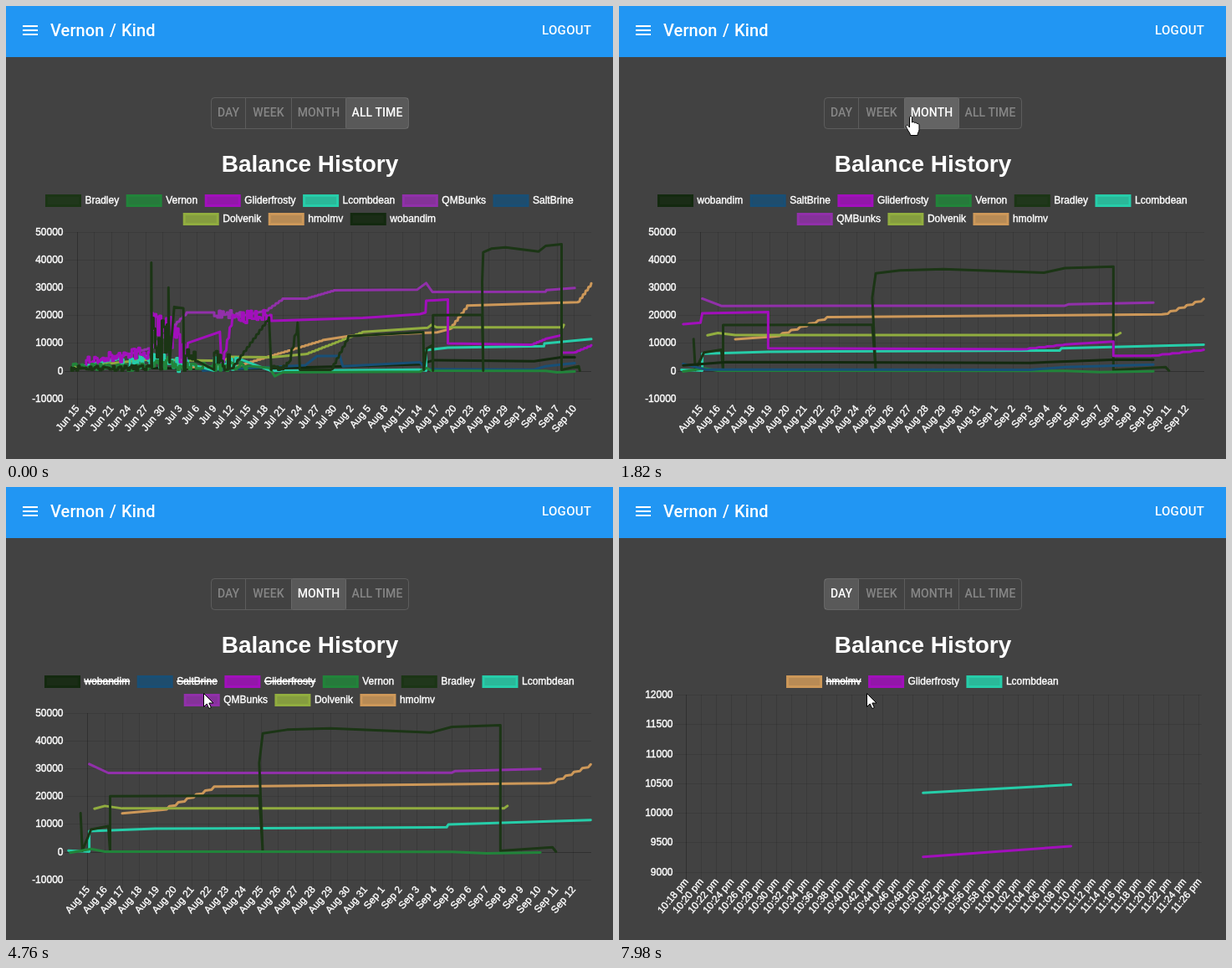
These frames come from a looping animation (726 px wide and 541 px high, 8 s). An HTML page:

```html
<!DOCTYPE html>
<html lang="en">
<head>
<meta charset="utf-8">
<title>Balance History</title>
<style>
html, body { margin: 0; width: 100%; height: 100%; overflow: hidden; background: #424242; }
svg { display: block; width: 726px; height: 541px; }
text { fill: #fff; font: 12px "Liberation Sans", Arial, sans-serif; }
text.ui { font: 500 14px Roboto, sans-serif; }
text.name { font-size: 20px; letter-spacing: .1px; }
text.logout { font-size: 15px; letter-spacing: .3px; }
text.title { font-size: 28px; font-weight: bold; }
.chart text { stroke: #fff; stroke-width: .4px; }
.line { fill: none; stroke-width: 3; stroke-linejoin: round; stroke-linecap: round; }
</style>
</head>
<body>
<svg viewBox="0 0 726 541">
  <rect width="726" height="541" fill="#424242"/>
  <rect width="726" height="61" fill="#2196f3"/>
  <path d="M20 24h18M20 29h18M20 34h18" stroke="#fff" stroke-width="2"/>
  <text class="ui name" x="53" y="36">Vernon</text>
  <text class="ui name" x="124" y="36">/</text>
  <text class="ui name" x="138" y="36">Kind</text>
  <text class="ui logout" x="641" y="34">LOGOUT</text>
  <g id="tabs"></g>
  <text class="title" x="363.5" y="198" text-anchor="middle">Balance History</text>
  <g id="charts"></g>
  <g id="cursor" stroke="#000" fill="#fff" stroke-linejoin="round">
    <path id="arrow" d="M.5 .5V16.5L4.2 13L6.8 18.6L9.4 17.4L6.9 12H12Z"/>
    <path id="hand" d="M-1.5 1.2C-1.3-.9 1.6-.9 1.6 1.2V7C2.4 6 4.4 6.3 4.6 7.6C5.6 6.8 7.2 7.3 7.4 8.6C8.6 8 10 8.8 10 10V15.5C10 18 8 19.5 8 22.5H-.5C-.5 20-3 17.8-4.4 14.6C-5.6 12.4-6.4 11.6-5.4 10.6C-4.2 9.6-2.6 11.4-1.5 13Z"/>
  </g>
</svg>
<script>
const LOOP = 8000, MONTH_AT = 1470, DAY_AT = 6732, RESCALE_AT = 7860;
const $ = id => document.getElementById(id);

function el(parent, tag, attrs = {}, text) {
  const node = document.createElementNS('http://www.w3.org/2000/svg', tag);
  for (const key in attrs) node.setAttribute(key, attrs[key]);
  if (text !== undefined) node.textContent = text;
  return parent.appendChild(node);
}

const show = (node, on) => { node.style.display = on ? '' : 'none'; };
const clamp = v => Math.min(1, Math.max(0, v));
const mix = (a, b, k) => a + (b - a) * k;
const smooth = v => v * v * (3 - 2 * v);
const outQuart = v => 1 - (1 - clamp(v)) ** 4;
const list = (n, fn) => Array.from({ length: n }, (_, i) => fn(i));

let seed = 11;
const random = () => (seed = seed * 16807 % 2147483647) / 2147483647;

// Key points "day,thousands"; "^day,value" climbs there in small steps,
// "~day,low,high" trades at random between two values until that day.
function history(spec) {
  const out = [];
  for (const token of spec.split(' ')) {
    const [d, a, b] = token.replace(/[~^]/, '').split(',').map(Number);
    const [d0, v0] = out[out.length - 1] || [d, a];
    const n = Math.ceil((d - d0) / .6);
    if (token[0] === '^') {
      for (let i = 0; i < n; i++)
        out.push([mix(d0, d, (i + .7) / n), mix(v0, a, (i + .2) / n)],
          [mix(d0, d, (i + 1) / n), mix(v0, a, (i + 1) / n)]);
    } else if (token[0] === '~') {
      for (let i = 0; i < 2 * n; i++) {
        const v = mix(a, b, random());
        out.push([mix(d0, d, i / 2 / n), v], [mix(d0, d, (i + 1) / 2 / n), v]);
      }
    } else out.push([d, a]);
  }
  return out;
}

const users = {
  br: ['Bradley', '#1b3515', '-1,1.2 ~13,0,2 13,39 13.1,1 ~16,0,19 16,30 16.2,3 17,23 18.6,22.5 18.7,2 ~21,0,8 24,.3 ~27,0,7 ^33.6,19.2 34,.3 ~37,0,3 ^38.6,17.3 39,.3 44.4,.3 ^47.5,12.5 60.6,13.9 60.7,.3 61.2,8 62.2,9.2 62.3,0 62.3,20 70.9,20.2 71.1,0 70.9,32 71.1,42.7 72.5,44 75,44.5 80.8,43 82,45 84.8,45.6 84.8,.3 87.8,1.6 88,0'],
  ro: ['Vernon', '#21843a', '-1,1.2 ~13,0,2.5 ~17,0,6 ~30,0,3 33.7,1 34.6,-2 36,-.6 60,-.4 61.2,1 62,0 82,-.1 84,-.6 87.1,-.3'],
  gl: ['Gliderfrosty', '#a20fbc', '1.6,2 ~5,2,5 ~9,3,7 ~13,4,9 ~17,8,21 ~19,3,16 19.4,10 25,14 25.3,2 ^27.2,20 ~34,17,22 34,18 50,19 60,20.4 61,21 61.1,25.2 64.9,25.7 64.9,9.8 79.5,9.4 ^82,11.5 84.8,12.8 84.8,6.5 87,6.6 ^90,9.2'],
  lc: ['Lcombdean', '#26cda9', '1,1.7 ^7.6,4.4 7.8,.7 ~13,.5,6 ~20,-1,6 24,0 ~28,0,5 34,-.1 59.9,.4 61.1,0 61.1,7.4 64.9,8.3 81.7,8.8 81.8,9.8 90,11.4'],
  qm: ['QMBunks', '#9130aa', '2,2.2 ^13,8.3 ^19.2,21 24,21 ~29,19,22 33,21.6 ^36,26 40,26 ^45,29 59.5,29.2 61.1,31.6 62.2,28.4 82,28.5 82.2,29.1 87.1,29.8'],
  sa: ['SaltBrine', '#184f76', '22,0 40,2 42,5.3 46,5.3 46.5,1.6 60,3 61.3,.5 80,.4 82,1.6 87.1,2.7'],
  do: ['Dolvenik', '#91ad3f', '-1,1.2 12.5,4 25.6,3.5 26.8,5 34,4.8 40,6 ^50,14 61.4,15.5 62,16.5 63,15.6 85,15.6 85.2,16.5'],
  hm: ['hmolmv', '#cd9859', '19,1.2 28,1.7 ^43,11 48,12.6 63,13.8 65.2,15 ^68.3,23.5 87.6,24.7 ^90,31.5'],
  wo: ['wobandim', '#13290f', '-1,1.2 28,.6 46,1.5 60,2.3 62.5,3.8 80,3.4 85,4.9 87.1,4.8']
};
const balances = {};
for (const id in users) balances[id] = history(users[id][2]);

// One evening, in minutes past ten
const evening = {
  hm: history('17.3,31.1 55.5,31.2 86.3,31.5'),
  gl: history('49.4,9.03 69,9.42'),
  lc: history('49.4,11.37 69,11.67')
};

const dates = (n, from, step) => list(n, i =>
  new Date(2019, 5, 15 + from + i * step).toLocaleDateString('en-US', { month: 'short', day: 'numeric' }));
const clock = m => `${10 + Math.floor(m / 60)}:${String(m % 60).padStart(2, '0')} pm`;

function drawLegend(c) {
  let row = [], y = 226.5;
  const width = items => items.reduce((sum, item) => sum + item.w + 56, -10);
  const flush = () => {
    let x = 363.6 - width(row) / 2;
    for (const { id, label, w } of row) {
      const color = users[id][1];
      el(c.node, 'rect', { x, y, width: 40, height: 12, fill: color, 'fill-opacity': .85, stroke: color, 'stroke-width': 3 });
      label.setAttribute('x', x + 46);
      label.setAttribute('y', y + 9.5);
      c.strikes[id] = el(c.node, 'path', { d: `M${x + 46} ${y + 5.5}h${w}`, stroke: '#fff', 'stroke-width': 2 });
      x += w + 56;
    }
    row = [];
    y += 22;
  };
  for (const id of c.legend) {
    const label = el(c.node, 'text', {}, users[id][0]);
    const item = { id, label, w: label.getComputedTextLength() };
    if (width([...row, item]) > 660) flush();
    row.push(item);
  }
  flush();
}

function buildChart(c) {
  const g = c.node = el($('charts'), 'g', { class: 'chart' });
  const grid = (d, dark) => el(g, 'path', { d, stroke: '#000', 'stroke-opacity': dark ? .27 : .11 });
  c.axis = list(7, i => {
    const y = mix(c.top, c.bottom, i / 6);
    grid(`M${c.left - 8} ${Math.round(y) + .5}H${c.right}`, c.hi - i * (c.hi - c.lo) / 6 === 0);
    return el(g, 'text', { x: c.left - 9.5, y: y + 4, 'text-anchor': 'end' });
  });
  c.labels.forEach((label, i) => {
    const x = c.first + i * c.step;
    grid(`M${Math.floor(x) + .5} ${c.top}V${c.bottom + 10}`, i === 0);
    el(g, 'text', {
      'text-anchor': 'end', dy: '.35em', transform: `translate(${x} ${c.bottom + 9.5}) rotate(-50)`
    }, label);
  });
  c.lines = {};
  c.strikes = {};
  for (const id of [...c.legend].reverse())
    c.lines[id] = {
      points: c.data[id].filter(p => p[0] >= c.since)
        .map(([d, v]) => [c.first + (d - c.origin) * c.step / c.unit, v]),
      path: el(g, 'path', { class: 'line', stroke: users[id][1] })
    };
  drawLegend(c);
  return c;
}

const days = { left: 78, right: 700, top: 270, bottom: 468.6, lo: -10, hi: 50, data: balances };
const charts = [
  {
    ...days, from: 0, to: MONTH_AT, born: -LOOP, labels: dates(30, 0, 3), first: 85, step: 20.5,
    origin: 0, unit: 3, since: -1, hides: {}, legend: Object.keys(users)
  },
  {
    ...days, from: MONTH_AT, to: DAY_AT, labels: dates(29, 61, 1), first: 97.5, step: 20.75,
    origin: 61, unit: 1, since: 59.9, hides: { gl: 3990, sa: 4300, wo: 4650, qm: 4950, do: 5750 },
    legend: ['wo', 'sa', 'gl', 'ro', 'br', 'lc', 'qm', 'do', 'hm']
  },
  {
    left: 74, right: 697, top: 248, bottom: 459.5, lo: 5, hi: 35, data: evening,
    from: DAY_AT, to: LOOP, labels: list(35, i => clock(18 + 2 * i)), first: 80.5, step: 18.04,
    origin: 18, unit: 2, since: 0, hides: { hm: RESCALE_AT }, zoom: { lo: 9, hi: 12 },
    legend: ['hm', 'gl', 'lc']
  }
].map(buildChart);

function drawChart(c, t) {
  const on = t >= c.from && t < c.to;
  show(c.node, on);
  if (!on) return;
  const scale = (v, { lo, hi }) => mix(c.bottom, c.top, (v - lo) / (hi - lo));
  const base = scale(Math.max(0, c.lo), c);
  const grow = outQuart((t - (c.born ?? c.from)) / 1000);
  const zoomed = c.zoom && t >= RESCALE_AT;
  const shift = outQuart((t - RESCALE_AT) / 1000);
  const { lo, hi } = zoomed ? c.zoom : c;
  c.axis.forEach((label, i) => { label.textContent = Math.round(mix(hi, lo, i / 6) * 1000); });
  for (const id in c.lines) {
    const { points, path } = c.lines[id], hidden = t >= c.hides[id];
    show(path, !hidden);
    show(c.strikes[id], hidden);
    if (hidden) continue;
    path.setAttribute('d', 'M' + points.map(([x, v]) => {
      const y = mix(base, scale(v, c), grow);
      return x.toFixed(1) + ' ' + (zoomed ? mix(y, scale(v, c.zoom), shift) : y).toFixed(2);
    }).join('L'));
  }
}

// label, left, right, selected span, hover span
const never = [LOOP, LOOP];
const tabs = [
  ['DAY', 245.5, 286.5, [6500, LOOP], [6430, 6960]],
  ['WEEK', 286.5, 341.5, never, never],
  ['MONTH', 341.5, 406.5, [1180, 6500], [960, 2860]],
  ['ALL TIME', 406.5, 481.5, [0, 1180], never]
].map(([name, x, end, active, hover]) => ({
  active, hover,
  fill: el($('tabs'), 'rect', { x, y: 109.5, width: end - x, height: 37, fill: '#fff', rx: 2 }),
  text: el($('tabs'), 'text', {
    class: 'ui', x: (x + end) / 2, y: 132, 'text-anchor': 'middle', 'letter-spacing': .1
  }, name)
}));
el($('tabs'), 'path', {
  d: 'M249.5 109.5h228q4 0 4 4v29q0 4-4 4h-228q-4 0-4-4v-29q0-4 4-4ZM286.5 110v36M341.5 110v36M406.5 110v36',
  fill: 'none', stroke: '#fff', 'stroke-opacity': .14
});

function drawTab({ fill, text, active, hover }, t) {
  const selected = t >= active[0] && t < active[1];
  const glow = clamp((t - hover[0]) / 150) * (1 - clamp((t - hover[1]) / 200));
  fill.setAttribute('fill-opacity', (selected ? .12 : 0) + .06 * glow);
  text.style.fill = selected ? '#fff' : '#868686';
}

// Pointer stops: arrival time, x, y, length of the glide there
const stops = [
  [130, 705, 525], [830, 349, 132, 700], [3500, 408, 228, 740], [3950, 340, 230], [4230, 230, 231],
  [4570, 120, 232], [4755, 236, 246, 90], [5680, 345, 249], [6450, 270, 126], [6970, 292, 154],
  [7560, 259, 230, 400], [7975, 296, 246, 80]
];

function drawCursor(t) {
  show($('cursor'), t >= stops[0][0]);
  let [, x, y] = stops[0];
  for (const [at, toX, toY, glide = 200] of stops) {
    const k = smooth(clamp((t - at + glide) / glide));
    x = mix(x, toX, k);
    y = mix(y, toY, k);
  }
  const link = y > 109 && y < 147 && x > 245 && x < 482;
  show($('hand'), link);
  show($('arrow'), !link);
  $('cursor').setAttribute('transform', `translate(${x} ${y})`);
}

const start = performance.now();
function frame() {
  const t = (performance.now() - start) % LOOP;
  charts.forEach(c => drawChart(c, t));
  tabs.forEach(tab => drawTab(tab, t));
  drawCursor(t);
  requestAnimationFrame(frame);
}
frame();
</script>
</body>
</html>
```
